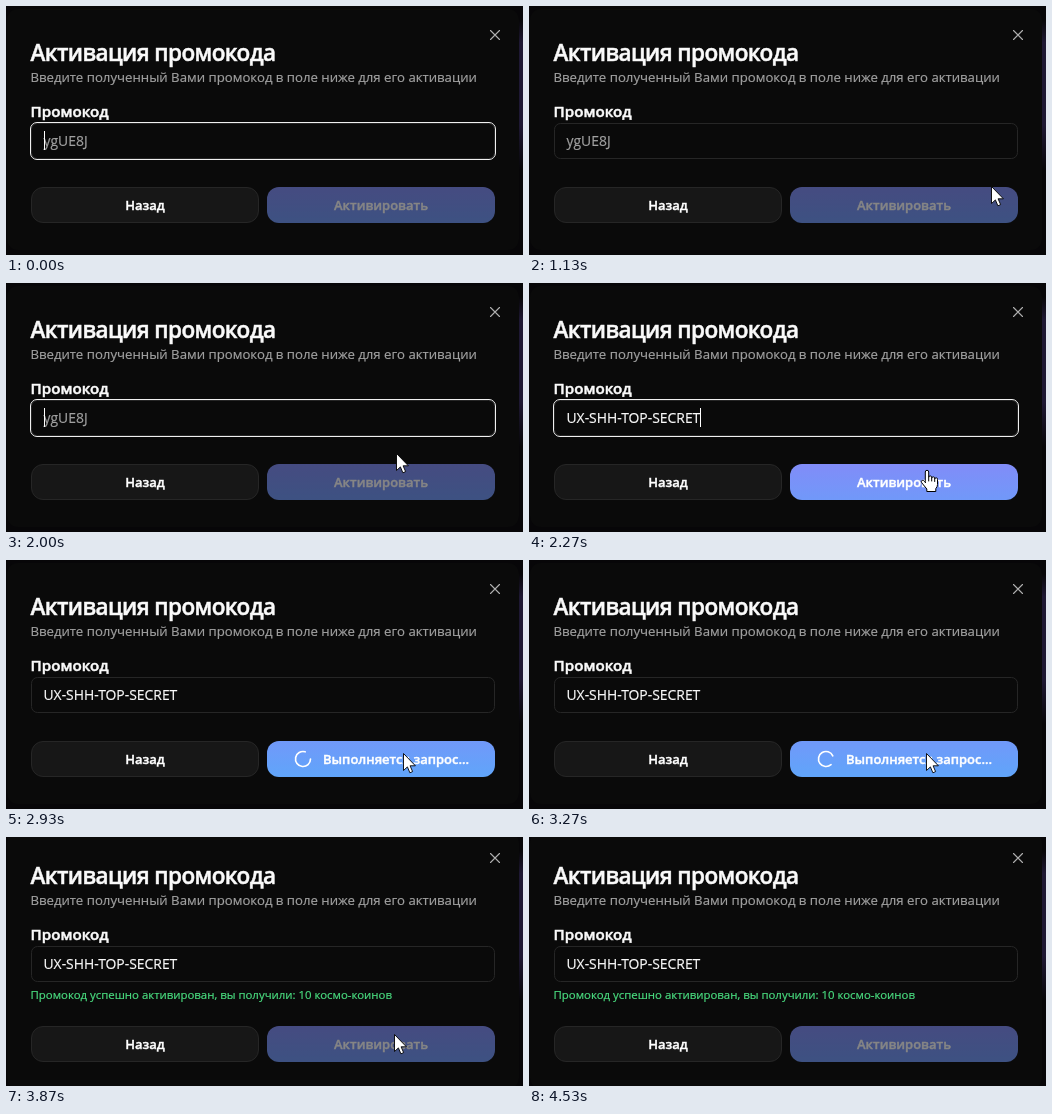
These frames come from a looping animation (517 by 249 pixels, 4940 ms). An HTML page:

```html
<!DOCTYPE html>
<html lang="ru">
<head>
<meta charset="utf-8">
<title>Активация промокода</title>
<style>
  html, body { margin: 0; width: 100%; height: 100%; overflow: hidden; background: #070608; }
  svg { display: block; width: 517px; height: 249px; font-family: "Open Sans", "Noto Sans", sans-serif; }
  /* A hairline outline thickens the lettering without widening it. */
  text { fill: currentColor; stroke: currentColor; stroke-width: .2px; color: #fafafa; }
  .semi { font-weight: 600; stroke-width: .5px; }
  .button { font-size: 13px; font-weight: 600; stroke-width: .4px; color: #fff; }
  .mid { text-anchor: middle; }
  .muted { color: #a1a1a1; }
  .success { color: #4ade80; }
  .line { fill: none; stroke-linecap: round; stroke-linejoin: round; }
</style>
</head>
<body>
<svg viewBox="0 0 517 249">
  <defs>
    <linearGradient id="paint" x1="0" x2="0" y1="0" y2="2">
      <stop stop-color="#818cf8"/><stop offset="1" stop-color="#60a5fa"/>
    </linearGradient>
    <linearGradient id="glow" x1="0" x2="0" y1="0" y2="1">
      <stop stop-color="#1e1833" stop-opacity="0"/><stop offset=".15" stop-color="#1e1833"/>
      <stop offset=".7" stop-color="#1e1833"/><stop offset="1" stop-color="#1e1833" stop-opacity="0"/>
    </linearGradient>
  </defs>

  <rect x="513" y="14" width="4" height="150" fill="url(#glow)"/>
  <rect id="dialog" x="1" width="512" rx="11" fill="#0a0a0a"/>

  <g id="upper">
    <path class="line" d="M484.5 24.5l9 9m0-9l-9 9" stroke="#b0b0b0" stroke-width="1.1"/>
    <text class="semi" x="24.5" y="55" font-size="22.5" letter-spacing="-.6">Активация промокода</text>
    <text class="muted" x="24.5" y="76" font-size="13.2">Введите полученный Вами промокод в поле ниже для его активации</text>
    <text class="semi" x="24.5" y="111" font-size="15.2">Промокод</text>
    <rect x="25.5" y="117.5" width="463" height="35" rx="6" fill="none" stroke="#262626"/>
    <rect id="ring" x="24.5" y="116.5" width="465" height="37" rx="6.5" fill="none" stroke="#f0f0f0"/>
    <text id="value" x="37.5" y="140" font-size="13.9"></text>
    <rect id="caret" y="125" width="1" height="19" fill="#fff"/>
    <text id="message" class="success" x="24.5" y="170" font-size="11.42">Промокод успешно активирован, вы получили: 10 космо-коинов</text>
  </g>

  <g id="lower">
    <rect x="25.5" y="181.5" width="227" height="35" rx="11.5" fill="#171717" stroke="#262626"/>
    <text class="button mid" x="139" y="204">Назад</text>
    <g id="submit">
      <rect x="261" y="181" width="228" height="36" rx="12" fill="url(#paint)"/>
      <text id="idle" class="button mid" x="375" y="204">Активировать</text>
      <g id="busy">
        <path id="spinner" class="line" d="M7.5 0A7.5 7.5 0 1 1 2.19-7.17" stroke="#fff" stroke-width="1.65"/>
        <text class="button" x="317" y="204">Выполняется запрос...</text>
      </g>
    </g>
  </g>

  <g id="pointer">
    <path id="arrow" d="M-.5-.5V16.5L3.4 12.9 5.9 18.8 8.6 17.6 6.1 11.8H11.4Z" fill="#fff" stroke="#000" stroke-width=".9"/>
    <path id="beam" class="line" d="M-3-7.5h2q1 0 1 1V6.5q0 1-1 1h-2M3-7.5H1q-1 0-1 1M0 6.5q0 1 1 1h2" stroke="#fff"/>
    <g id="hand" stroke="#000" class="line">
      <path fill="#fff" d="M-1.7 11V2a1.7 1.7 0 0 1 3.4 0V7.3a1.5 1.5 0 0 1 3 .3V8.2a1.5 1.5 0 0 1 3 .3V9a1.4 1.4 0 0 1 2.8.4V14.5Q10.5 17 8.8 18.6V21.5H-.2V19L-5.3 12.7Q-6.3 11-4.8 10.3-3.7 10-2.6 11.3L-1.7 12.5Z"/>
      <path d="M1.7 7.5V11M4.7 8.2V11M7.7 9V11.5"/>
    </g>
  </g>
</svg>
<script>
const LOOP = 4940, TICK = 1000 / 15;
const el = id => document.getElementById(id);
const set = (id, attrs) => { for (const name in attrs) el(id).setAttribute(name, attrs[name]); };
const show = (id, on) => set(id, { visibility: on ? "inherit" : "hidden" });
const ramp = (k, from, to) => Math.min(1, Math.max(0, (k - from) / (to - from)));
const smooth = u => u * u * (3 - 2 * u);
const easeOut = u => 1 - (1 - u) ** 2;

// Pointer path: tick, x, y
const path = [
  [17, 463, 181], [21, 394.5, 145], [25, 394.5, 145], [30, 391, 171], [32, 391, 180],
  [34, 398, 187], [40, 398, 194], [56, 398, 194], [58, 389, 198], [61, 389, 198], [67, 140, 239]
];

function pointerAt(k) {
  const i = Math.max(1, path.findIndex(p => p[0] >= k));
  const [a, b] = [path[i - 1], path[i]];
  const u = ramp(k, a[0], b[0]);
  return [1, 2].map(n => a[n] + (b[n] - a[n]) * u);
}

function drawPointer(k) {
  const visible = k >= 17 && k <= 67;
  show("pointer", visible);
  if (!visible) return;
  const [x, y] = pointerAt(k);
  const hand = k >= 33 && k < 43, beam = y > 117 && y < 153;
  show("hand", hand);
  show("beam", beam);
  show("arrow", !hand && !beam);
  const snap = beam ? v => Math.floor(v) + .5 : Math.round;
  set("pointer", { transform: `translate(${snap(x)} ${snap(y)})` });
}

function draw(time) {
  const k = Math.floor((time % LOOP + 4) / TICK);
  const filled = k >= 33, busy = k >= 43 && k < 50;
  const focused = k < 2 || (k >= 25 && k < 43);
  // The centred dialog grows by whole pixels, so each half moves in half pixels.
  const grow = Math.round(16 * easeOut(ramp(k, 49, 54))) / 2;

  set("dialog", { y: 3 - grow, height: 241 + 2 * grow });
  set("upper", { transform: `translate(0 ${-grow})` });
  set("lower", { transform: `translate(0 ${grow})` });

  show("ring", focused);
  show("caret", focused && k < 41);
  set("caret", { x: filled ? 171 : 38 });
  el("value").textContent = filled ? "UX-SHH-TOP-SECRET" : "ygUE8J";
  set("value", { class: filled ? "" : "muted" });
  set("message", { opacity: ramp(k, 49, 52) });

  const hover = smooth(ramp(k, 34, 40)) * (1 - ramp(k, 49, 52));
  set("paint", { y1: -hover, y2: 2 - hover });
  set("submit", { opacity: .5 + .5 * ramp(k, 32, 34) * (1 - ramp(k, 49, 52)) });
  show("idle", !busy);
  show("busy", busy);
  set("spinner", { transform: `translate(297 199) rotate(${k >= 46 ? 48 : 0})` });

  drawPointer(k);
}

const start = performance.now();
function frame() {
  draw(performance.now() - start);
  requestAnimationFrame(frame);
}
frame();
</script>
</body>
</html>
```
